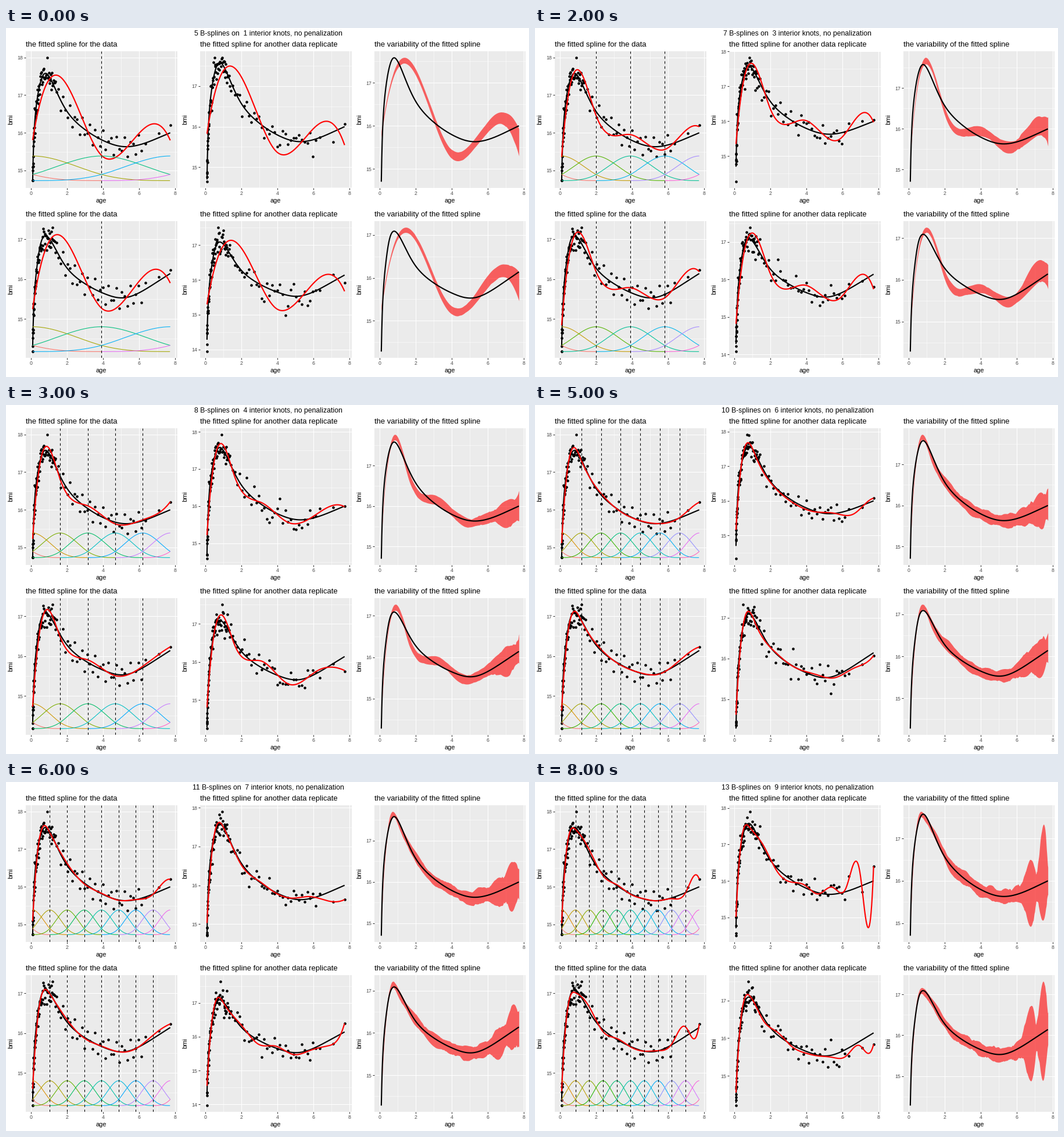
Animation of 900 by 600 pixels, one loop 9 s. Source, as a matplotlib script:

```python
import numpy as np
import matplotlib.pyplot as plt
from matplotlib.animation import FuncAnimation

W, H, DPI = 900, 600, 100
PX = 72 / DPI                      # points per pixel
X0, X1 = 0.08, 7.72                # age range
SIGMA = 0.18                       # noise around the mean curve

plt.rcParams.update({
    "font.family": "Liberation Sans", "font.size": 8.8 * PX,
    "axes.facecolor": "#EBEBEB", "axes.axisbelow": True,
    "axes.spines.left": False, "axes.spines.right": False,
    "axes.spines.top": False, "axes.spines.bottom": False,
})
for side in ("xtick", "ytick"):
    plt.rcParams.update({
        side + ".color": "#333333", side + ".labelcolor": "#4D4D4D",
        side + ".labelsize": 8.8 * PX, side + ".major.size": 2.75 * PX,
        side + ".major.width": 1.07 * PX, side + ".major.pad": 2.2 * PX,
        side + ".minor.size": 0,
    })


def natural_spline(xk, yk, x):
    """Natural cubic spline through (xk, yk), evaluated at x."""
    xk, yk = np.asarray(xk, float), np.asarray(yk, float)
    n, h = len(xk), np.diff(xk)
    a, b = np.eye(n), np.zeros(n)
    for i in range(1, n - 1):
        a[i, i - 1:i + 2] = h[i - 1], 2 * (h[i - 1] + h[i]), h[i]
        b[i] = 6 * ((yk[i + 1] - yk[i]) / h[i] - (yk[i] - yk[i - 1]) / h[i - 1])
    m = np.linalg.solve(a, b)
    i = np.clip(np.searchsorted(xk, x) - 1, 0, n - 2)
    l, r, d = xk[i + 1] - x, x - xk[i], h[i]
    return ((m[i] * l**3 + m[i + 1] * r**3) / (6 * d)
            + (yk[i] / d - m[i] * d / 6) * l + (yk[i + 1] / d - m[i + 1] * d / 6) * r)


def basis(x, k):
    """The k + 4 cubic B-splines on k equally spaced interior knots."""
    t = (x[:, None] - X0) / (X1 - X0) * (k + 1)
    u = np.abs(t - np.arange(-1, k + 3))
    return np.where(u < 1, 2 / 3 - u**2 + u**3 / 2, np.clip(2 - u, 0, None)**3 / 6)


def hue(i, n):
    """Evenly spaced hues at luminance 65, chroma 100."""
    a = np.radians(15 + 360 * i / n)
    u, v = 100 * np.cos(a) / 845 + 0.1978, 100 * np.sin(a) / 845 + 0.4683
    y = (81 / 116)**3
    xyz = np.array([9 * u * y / (4 * v), y, y * (12 - 3 * u - 20 * v) / (4 * v)])
    m = np.array([[3.2405, -1.5371, -0.4985], [-0.9693, 1.8760, 0.0416],
                  [0.0556, -0.2040, 1.0572]])
    lin = np.clip(m @ xyz, 0, 1)
    return np.where(lin <= 0.0031308, 12.92 * lin, 1.055 * lin**(1 / 2.4) - 0.055)


# Key points of the mean curves, one per row
KEY_X = [.08, .12, .2, .35, .55, .8, 1.2, 2, 3, 4.2, 5.3, 6.4, 7.72]
KEY_Y = [
    [14.70, 15.5, 16.3, 16.95, 17.4, 17.58, 17.31, 16.56, 16.08, 15.75, 15.63, 15.74, 16.0],
    [14.28, 15.0, 15.75, 16.42, 16.93, 17.09, 16.88, 16.27, 15.88, 15.61, 15.54, 15.76, 16.14],
]
DATA_RANGE = [(14.73, 18.0), (14.18, 17.3)]
TAIL = [(-.02, .11, .2), (.17, .1, .09)]      # deviations at the three last ages

# Ages: dense early on, even later, three sparse ones at the end
EARLY, LATE = 63, 34
AGES = np.concatenate([X0 + 1.25 * np.linspace(0, 1, EARLY)**1.7,
                       1.42 + 4.7 * np.linspace(0, 1, LATE)**1.1, [6.33, 7.1, X1]])
GRID = np.sort(np.concatenate([np.geomspace(X0, X1, 300), np.linspace(X0, X1, 500)]))


def mean_bmi(x, row):
    return natural_spline(np.log(KEY_X), KEY_Y[row], np.log(x))


MEAN = [mean_bmi(GRID, row) for row in range(2)]
MEAN_AT_AGES = [mean_bmi(AGES, row) for row in range(2)]


def fitted(y, k):
    """Least squares spline on the grid; y may hold one sample per column."""
    return basis(GRID, k) @ np.linalg.lstsq(basis(AGES, k), y, rcond=None)[0]


def first_sample(row):
    early = np.random.default_rng(4 + row).normal(0, SIGMA, EARLY)
    late = 1.5 * SIGMA * np.sin(2.4 * np.arange(LATE) + row)
    y = MEAN_AT_AGES[row] + np.concatenate([early, late, TAIL[row]])
    lo, hi = DATA_RANGE[row]
    y[y.argmin()], y[y.argmax()] = lo, hi
    return np.clip(y, lo, hi)


def noisy(row, k, count):
    rng = np.random.default_rng(100 * row + k)
    return MEAN_AT_AGES[row][:, None] + rng.normal(0, SIGMA, (len(AGES), count))


fig = plt.figure(figsize=(W / DPI, H / DPI), dpi=DPI, facecolor="white")


def label(x, y, s, size, **kw):
    return fig.text(x / W, 1 - y / H, s, fontsize=size * PX, color="black", **kw)


TITLES = ["the fitted spline for the data",
          "the fitted spline for another data replicate",
          "the variability of the fitted spline"]
heading = label(451.5, 13, "", 12.2, ha="center")
axes = []
for row in range(2):
    for col, title in enumerate(TITLES):
        left, top = 34 + 300 * col, 40 + 292 * row
        axes.append(fig.add_axes([left / W, 1 - (top + 235) / H, 260.5 / W, 235 / H]))
        label(left, top - 8, title, 13)
        label(left + 130, top + 259.5, "age", 11, ha="center")
        label(left - 25.5, top + 117.5, "bmi", 11, ha="center", va="center", rotation=90)


def prepare(ax, row, *values):
    """Empty panel whose limits hold the mean curve and the values."""
    ax.clear()
    shown = np.concatenate([MEAN[row], *values])
    lo, hi = shown.min(), shown.max()
    pad_x, pad_y = .05 * (X1 - X0), .05 * (hi - lo)
    lo, hi = lo - pad_y, hi + pad_y
    ax.set_xlim(X0 - pad_x, X1 + pad_x)
    ax.set_xticks(range(0, 9, 2))
    ax.set_xticks(range(1, 8, 2), minor=True)
    ax.set_yticks(np.arange(np.ceil(lo), hi))
    ax.set_yticks(np.arange(np.ceil(lo - .5) + .5, hi), minor=True)
    ax.yaxis.set_major_formatter("{x:.0f}")
    ax.set_ylim(lo, hi)
    ax.grid(which="major", color="white", lw=1.07 * PX)
    ax.grid(which="minor", color="white", lw=.53 * PX)


def dots(ax, y):
    ax.plot(AGES, y, "o", color="black", ms=4.6 * PX, mew=0)


def line(ax, y, color, width=2.13, x=GRID):
    ax.plot(x, y, color=color, lw=width * PX, solid_capstyle="butt")


def draw_fit(ax, row, k, y):
    prepare(ax, row, y)
    dots(ax, y)
    line(ax, MEAN[row], "black")
    line(ax, fitted(y, k), "red")


def draw_data(ax, row, k):
    draw_fit(ax, row, k, first_sample(row))
    lo, hi = DATA_RANGE[row]
    for j, b in enumerate(basis(GRID, k).T):
        on = b > 0
        line(ax, lo + .3 * (hi - lo) * b[on], hue(j, k + 4), 1.07, GRID[on])
    for x in np.linspace(X0, X1, k + 2)[1:-1]:
        ax.axvline(x, color="black", lw=1.07 * PX, ls=(0, (4, 4)))


def draw_replicate(ax, row, k):
    draw_fit(ax, row, k, noisy(row, k, 1)[:, 0])


def draw_band(ax, row, k):
    low, high = np.quantile(fitted(noisy(row, k, 100), k), [.02, .98], axis=1)
    prepare(ax, row, low, high)
    ax.fill_between(GRID, low, high, color="red", alpha=.6, lw=0)
    line(ax, MEAN[row], "black")


def draw(i):
    k = i + 1
    heading.set_text(f"{k + 4} B-splines on  {k} interior knots, no penalization")
    for n, ax in enumerate(axes):
        (draw_data, draw_replicate, draw_band)[n % 3](ax, n // 3, k)
    return axes


anim = FuncAnimation(fig, draw, frames=9, interval=1000, repeat=True, repeat_delay=0, blit=False)
plt.show()
```
